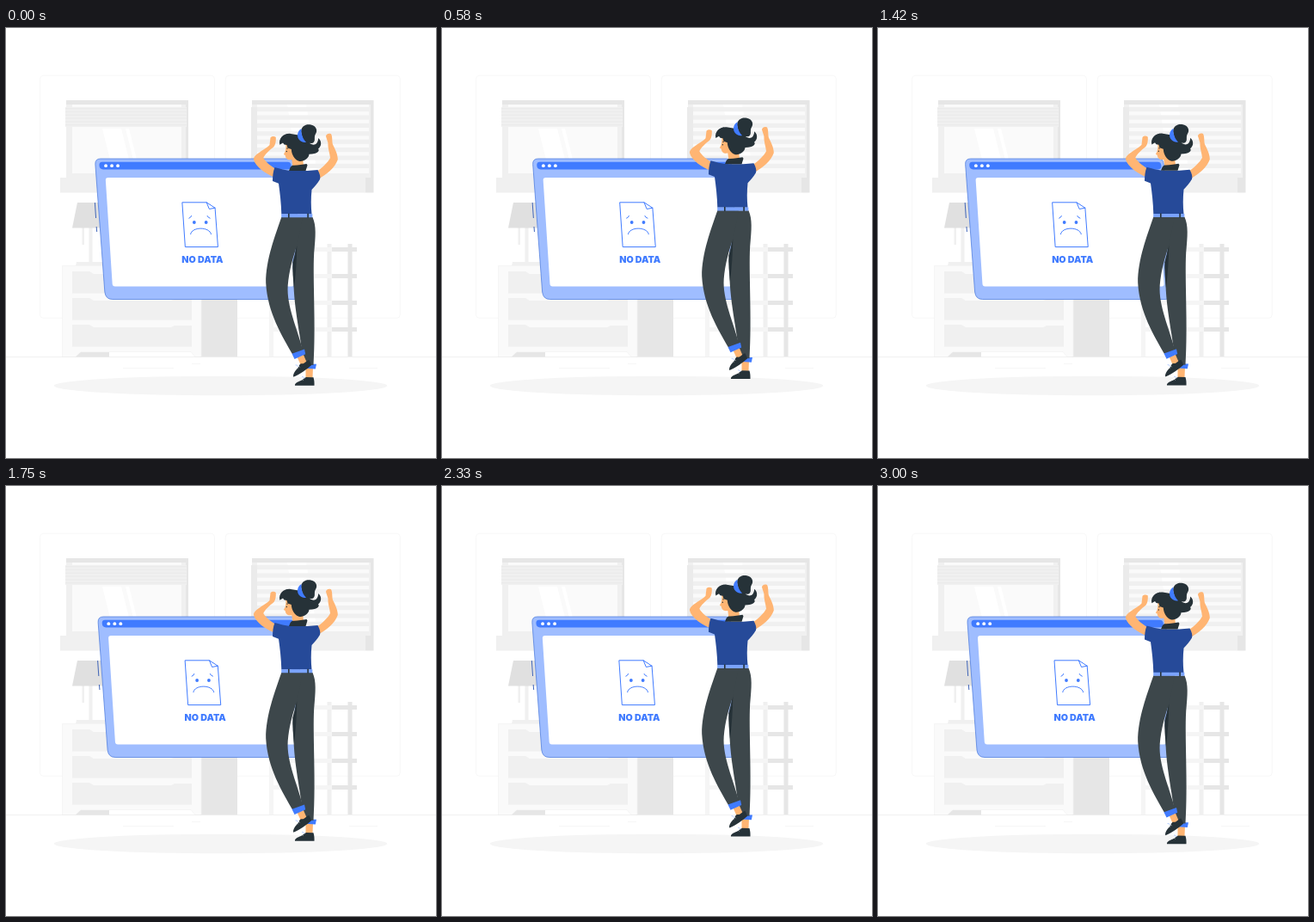
An HTML page that plays this animation: 500 px wide and 500 px high, repeating every 3.04 s.

```html
<!DOCTYPE html>
<html lang="en">
<head>
<meta charset="utf-8">
<title>No data</title>
<style>
html, body { margin: 0; width: 100%; height: 100%; overflow: hidden; background: #fff; }
svg { display: block; width: 100%; height: 100%; }
.label { font: 900 10.7px Inter, "DejaVu Sans", sans-serif; }
.skin { fill: #ffb573; }
.dark { fill: #263238; }
.blue { fill: #407bff; }
.line { fill: none; stroke: #407bff; stroke-linecap: round; stroke-linejoin: round; }
</style>
</head>
<body>
<svg viewBox="0 0 500 500">
  <!-- room -->
  <g fill="none" stroke="#f5f5f5" stroke-width=".8">
    <rect x="39.5" y="55.3" width="203" height="282" rx="4"/>
    <rect x="255.3" y="55.3" width="203" height="282" rx="4"/>
  </g>

  <g id="leftWindow">
    <path fill="#f0f0f0" d="M70 84h139v90H70z"/>
    <path fill="#e6e6e6" d="M209 84h3v90h-3z"/>
    <path fill="#fafafa" d="M77 89h127v80H77z"/>
    <path fill="#fff" d="M125 169l-13-52h22l13 52zM152 169l-13-52h4l13 52z"/>
    <path fill="#f0f0f0" d="M63 174h149v17.500H63z"/>
    <path fill="#e6e6e6" d="M70 84h140v5H70z"/>
    <g id="foldedBlind"></g>
  </g>

  <g id="rightWindow">
    <path fill="#f0f0f0" d="M286 84h139v90H286z"/>
    <path fill="#e6e6e6" d="M424 84h3.500v90H424zM286 84h139v5H286z"/>
    <path fill="#fafafa" d="M292 89h130v80H292z"/>
    <path fill="#fff" d="M340 169l-13-80h22l13 80z"/>
    <path fill="#f0f0f0" d="M279 174h139v17.500H279z"/>
    <path fill="#e6e6e6" d="M418 174h9.500v17.500H418z"/>
    <g id="openBlind"></g>
  </g>

  <g id="lamp">
    <path fill="#f0f0f0" d="M88.500 232h2.500v20h-2.500zM96.500 232h4v40h-4zM82 272h33v4.500H81z"/>
    <path fill="#e0e0e0" d="M83 203h29l5 29.500H77z"/>
  </g>

  <g id="dresser">
    <path fill="#e6e6e6" d="M227 276h42v106.500h-42zM81 382.500l6-5.500h33v5.500z"/>
    <path fill="#fafafa" stroke="#f2f2f2" stroke-width=".7" d="M65.500 276.500H227v106H220l-5-6H87l-6 6H65.500z"/>
    <path fill="#e6e6e6" d="M81 382.500l6-5.500h33v5.500z"/>
    <g id="drawers" fill="#f0f0f0"></g>
  </g>

  <g id="shelf">
    <path fill="#f5f5f5" d="M306 251h5v131h-5z"/>
    <path fill="#f0f0f0" d="M373.500 251h5v131h-5z"/>
    <path fill="#e6e6e6" d="M397.500 251h5v131h-5z"/>
    <g id="boards"></g>
  </g>

  <path stroke="#ebebeb" stroke-width=".7" d="M0 382.500H500"/>
  <path stroke="#f0f0f0" stroke-width=".6" d="M136 395.500h59M216 390.500h10M399 395.500h33"/>
  <ellipse cx="249.500" cy="416" rx="193.800" ry="11.300" fill="#f5f5f5"/>

  <g id="screen">
    <path fill="#9fbdff" stroke="#4474da" stroke-width=".7" d="M110 152H329q5 0 5.500 6L344.500 307q.5 8.500-8 8.500H124q-8 0-9-8.500L104 158.500q-.3-6.500 6-6.500z"/>
    <path class="blue" d="M112 155.700H327.500q4 0 4.300 4.400t-3.600 4.400H113q-4 0-4.400-4.400t3.400-4.400z"/>
    <g fill="#fff">
      <circle cx="116.200" cy="160.200" r="1.900"/>
      <circle cx="123.200" cy="160.200" r="1.900"/>
      <circle cx="130.200" cy="160.200" r="1.900"/>
      <path d="M119 174H323.500q3 0 3.200 3L335 297.500q.2 3-2.800 3H127q-3 0-3.200-3L116 177q-.2-3 3-3z"/>
    </g>
    <path fill="none" stroke="#2d56b3" stroke-width=".9" d="M103.500 203l1.200 18M105.300 231l.5 6"/>
    <g class="line">
      <path d="M205.400 202.800H233.300L243.200 209.200 246.600 254.600H208.900zM233.300 202.800l3.200 7.700 6.700-1.300"/>
      <path d="M213 221.200q2.200-.7 2.700-2.700M234.200 218.500q.7 2 3.100 2.700M214.800 239.700C216 230.800 237 230.800 238.600 239.700"/>
    </g>
    <g class="blue">
      <circle cx="219" cy="226" r="1.900"/>
      <circle cx="232.800" cy="226" r="1.900"/>
      <text class="label" x="228.600" y="272.900" text-anchor="middle">NO DATA</text>
    </g>
  </g>

  <g id="woman">
    <!-- arms -->
    <g class="skin">
      <path d="M307.500 128C309 126 312 126 313.800 127.500 314 132 313.500 136 311.500 138.500 306 143 301 147.500 299.300 151.500 302 156.500 309 162 314 164.500L312 174C303 170.500 290 162 288 153.500 287.500 147 302 142 306.500 136.500z"/>
      <path d="M372 126.500C372 124 375 122.500 378 123.700 379.800 127 379 132 380 136 382.500 141 386 148 385.800 153.500 383 162.500 372 171.500 363.500 176L361.500 167C367 164 375 156 377 151.500 376.500 146 374 140 374.400 134z"/>
    </g>

    <!-- shoes, ankles and cuffs -->
    <path class="skin" d="M348.500 395h8.500l-.5 12h-8z"/>
    <path class="dark" d="M336 416.300C335.500 413.500 339 412 343 410.500 346 409 347 407 349 406.500L357.500 406.700C358.500 410 358.700 413 358.500 416.300z"/>
    <path class="blue" d="M344 391l17 .3-1.200 5.700-15-1z"/>
    <path fill="#3d474b" d="M320.300 220.500H356.500C361 231 360 242 358.200 262 356.500 292 360.500 345 357.500 392.500L346 392C343.500 360 333 322 334.500 285L337 254z"/>
    <path class="dark" d="M338.300 253.500C338 270 337 287 335 303 333.800 292 333 283 333.300 273z"/>
    <path class="skin" d="M338.500 383l7-3.500 4.500 10.500-7 3z"/>
    <path class="dark" d="M334.200 406.200C333.200 402.500 337 398.500 340 395 341 392.500 342 390.500 343.800 390.800 347 391.500 349.500 387 352.500 386.500L355.200 392.500C350 397 342 403.500 334.200 406.200z"/>
    <path fill="none" stroke="#fff" stroke-width=".7" d="M339 393l2.500 1.800M337.500 395l2 1.500M343.500 408.300l2 1.800"/>
    <path fill="none" stroke="#9fbdff" stroke-width=".7" d="M336.500 392.500q2-1 3 2M344 406q2-.5 3 2"/>
    <path fill="#3d474b" d="M320.300 220.500C313 242 302 270 302.200 297 304 331 321 359 334.500 382L345.500 376.500C339 350 326 324 327.700 300 329 283 334 266 338.500 253L345 220.500z"/>
    <path class="blue" d="M332.500 379.300L347 374l1.200 5.800-12.700 5.700z"/>

    <!-- shirt and belt -->
    <path fill="#264a99" d="M312.500 162.500C319 164.500 325 165.500 330 166.500H350.500L362.500 165.500C365 170 366 174 365 176.500 362 181.500 359 185 355.500 188.500 354.500 198 354.500 208 355.500 217H320.300C320 204 318.500 192 317 181.200L310 178.500C310 173 310.500 167 312.500 162.500z"/>
    <path fill="#7aa3ff" d="M320.200 216.800H356.300v4H320.200z"/>
    <path class="dark" d="M328 216.300h1.600v5H328zM350.300 216.300h1.600v5h-1.600z"/>

    <!-- head -->
    <path class="skin" d="M325 135C326 139 325 142 324.700 144L322.900 147.500 324.700 148.600C325 152 327 154.500 332.300 153.800L333.300 161H346L344.500 145 340 134z"/>
    <path class="dark" d="M329 166.500C330 163.500 331 161 333 160.200 339 160.500 345 159 349.500 158.500L350.500 160 348.500 166.500z"/>
    <path class="dark" d="M318.300 136.200C316.500 128 324 122.500 331 123.500L340 125 351 131.500C354 137.500 362.500 139 363.200 128.500 367.500 132 367 138 363 141 365 143 363 147 352.500 147.300 352 152.500 345.500 156.500 340.500 155.300 335.500 153.500 332 147.500 331.800 141.500L327.500 140 326.500 136.500 323.500 136 322 134z"/>
    <path class="dark" d="M343 121C343.500 114.500 348.500 112 354.500 113 361.500 114.500 362.500 120.500 359.800 124 357.500 128 361 132.500 356 134.500L346 134z"/>
    <path class="blue" d="M343.500 117.500C338.500 120.500 337.500 127 341.500 131 343.500 133 346.500 134 349 133.200 345 129.500 343 124 343.500 117.500z"/>
    <path fill="none" stroke="#263238" stroke-width=".7" d="M319 131q3-6 9-7M326 140.500l2 .3"/>
    <circle class="dark" cx="326.300" cy="144" r=".7"/>
  </g>
</svg>
<script>
const $ = id => document.getElementById(id);
const LOOP = 3040, FRAMES = 73, FPS = 24;
const FLOAT_HEIGHT = 10;
// Horizontal offset at every tenth of the loop
const SHAKE = [0, -1, 2, -4, 4, -4, 4, -4, 2, -1, 0];

const repeat = (count, draw) => Array.from({ length: count }, (_, i) => draw(i)).join("");
const bar = (x, y, w, h, fill) =>
  `<rect x="${x}" y="${y}" width="${w}" height="${h}" fill="${fill}"/>`;

$("foldedBlind").innerHTML = bar(69, 92, 141, 23, "#f0f0f0") +
  repeat(6, i => bar(69, 93 + i * 3.8, 141, 1.4, "#ebebeb"));
$("openBlind").innerHTML = repeat(8, i => bar(285, 92 + i * 9.4, 138, 5.2, "#f0f0f0")) +
  bar(285, 92, 7, 77, "#ebebeb");
$("drawers").innerHTML = repeat(3, i => {
  const y = 283 + i * 31;
  return `<path d="M77 ${y}h20l5 3h90l4-2h20v24.500H77z"/>`;
});
$("boards").innerHTML = repeat(4, i => {
  const y = 255 + i * 31;
  return bar(306, y, 73, 5, "#f5f5f5") + bar(379, y, 29, 5, "#e6e6e6");
});

function shakeAt(phase) {
  const pos = phase * 10, i = Math.min(9, Math.floor(pos));
  return SHAKE[i] + (SHAKE[i + 1] - SHAKE[i]) * (pos - i);
}

function floatAt(phase) {
  const half = phase * 2 % 1;
  return -FLOAT_HEIGHT * (1 - Math.abs(2 * half - 1));
}

function render(ms) {
  const step = Math.floor((ms % LOOP + 5) * FPS / 1000);
  const phase = (step + 1) / FRAMES % 1;
  $("screen").setAttribute("transform", `translate(${shakeAt(phase).toFixed(3)} 0)`);
  $("woman").setAttribute("transform", `translate(0 ${floatAt(phase).toFixed(3)})`);
}

const start = performance.now();
function tick() {
  render(performance.now() - start);
  requestAnimationFrame(tick);
}
tick();
</script>
</body>
</html>
```
